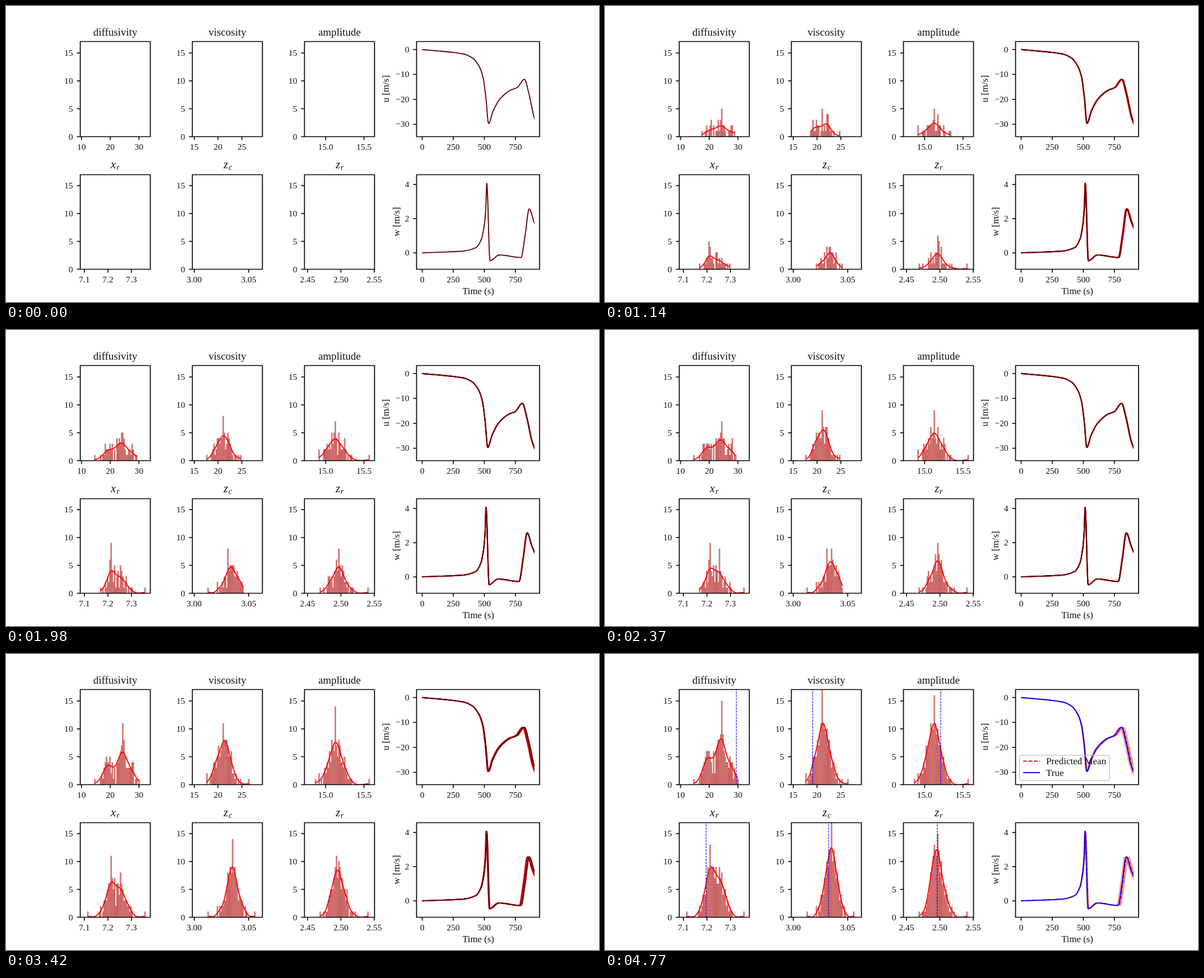
An HTML page with a canvas that plays this animation: 1058 by 529 pixels, repeating every 6450 ms.

```html
<!DOCTYPE html>
<html lang="en">
<head>
<meta charset="utf-8">
<title>Parameter sampling</title>
<style>
html, body { margin: 0; width: 100%; height: 100%; overflow: hidden; background: #fff; }
canvas { display: block; }
</style>
</head>
<body>
<canvas id="stage" width="1058" height="529"></canvas>
<script>
const ctx = document.getElementById('stage').getContext('2d');
const LOOP = 6450, STEP = 30, LAST = 159, REVEAL = 150;
const DRAWS = 158, BIN = 2.08, UNIT = 9.97, WIDTH = 125, TRAIL = 9, CURVE = 1.9;
const ROWS = [{ top: 63.5, base: 233.5 }, { top: 301.5, base: 470.5 }];
const RIGHT = 732.5, RIGHT_WIDTH = 219.5;

// modes: [share, centre, spread] of the distribution; span: its two outliers.
const panels = [
  { title: 'diffusivity', ticks: ['10', '20', '30'], at: 134.7, gap: 51.25, truth: 234.3,
    modes: [[0.32, 183, 7], [0.52, 206.5, 7], [0.16, 226, 5]], peak: 208, span: [158, 237] },
  { title: 'viscosity', ticks: ['15', '20', '25'], at: 335.8, gap: 42.5, truth: 370.5,
    modes: [[0.7, 388.5, 8.5], [0.18, 404, 8], [0.12, 372, 5.5]], peak: 387.7, span: [357.5, 434] },
  { title: 'amplitude', ticks: ['15.0', '15.5'], at: 570.3, gap: 68.4, truth: 599,
    modes: [[1, 587, 12]], peak: 587.7, span: [552, 647] },
  { title: 'x', sub: 'r', ticks: ['7.1', '7.2', '7.3'], at: 139.8, gap: 42, truth: 180.3,
    modes: [[0.58, 187.5, 9], [0.42, 207, 9]], peak: 187.5, span: [146, 247] },
  { title: 'z', sub: 'c', ticks: ['3.00', '3.05'], at: 335.8, gap: 97.2, truth: 399,
    modes: [[1, 403.5, 10.5]], peak: 404.2, span: [361, 444] },
  { title: 'z', sub: 'r', ticks: ['2.45', '2.50', '2.55'], at: 538, gap: 59.5, truth: 592.7,
    modes: [[0.75, 589.5, 9], [0.25, 602, 11]], peak: 594, span: [560.5, 646] }
];
const uKeys = [[742.5, 77.7], [815, 85.5], [832, 92.7], [844, 107.5], [851, 127], [856, 162], [861, 209.8],
  [869, 188], [881, 166.5], [900, 150.5], [912, 145.8], [925, 131], [933, 157], [942, 198], [950, 219]];
const wKeys = [[742.5, 441.2], [815, 438], [838, 432], [848, 417], [853.5, 390], [856, 362], [857.8, 317],
  [863.5, 455.3], [880, 445], [919, 449.4], [926, 411], [933.5, 362.5], [942, 386], [950, 405]];

const rand = n => { const v = Math.sin(n * 127.1 + 11.7) * 43758.5453; return v - Math.floor(v); };
const clamp = (v, lo, hi) => Math.min(hi, Math.max(lo, v));
const probit = q => 4.91 * (q ** 0.14 - (1 - q) ** 0.14);

// Loosely stratified draws, now and then the favourite value, in shuffled order.
function sample({ modes, peak, span }, seed) {
  const values = modes.flatMap(([share, centre, spread]) => {
    const n = Math.round(share * DRAWS);
    return Array.from({ length: n }, (_, j) => j % 28 === 14 ? peak
      : centre + spread * probit(clamp((j + 2 * rand(++seed) - 0.5) / n, 0.008, 0.992)));
  });
  const shuffled = values.map(x => ({ x, key: rand(++seed) })).sort((a, b) => a.key - b.key);
  return [
    ...shuffled.map(({ x }, i) => ({ x, born: i + 1 })),
    ...span.map(x => ({ x, born: 30 + 80 * rand(++seed) }))
  ];
}
panels.forEach((panel, i) => { panel.draws = sample(panel, 1000 * i); });

// Monotone cubic through the keys; late features move by up to `shift`.
function trace(keys, shift) {
  const pts = keys.map(([x, y]) => [x + shift * clamp((x - 825) / 90, 0, 1), y]);
  const slope = i => (pts[i + 1][1] - pts[i][1]) / (pts[i + 1][0] - pts[i][0]);
  const tangent = pts.map((_, i) => {
    if (i === 0) return slope(0);
    if (i === pts.length - 1) return slope(i - 1);
    const a = slope(i - 1), b = slope(i);
    return a * b <= 0 ? 0 : 2 * a * b / (a + b);
  });
  const out = [pts[0]];
  for (let i = 0; i < pts.length - 1; i++) {
    const [x0, y0] = pts[i], [x1, y1] = pts[i + 1], h = x1 - x0;
    for (let n = 1; n <= 10; n++) {
      const t = n / 10, r = 1 - t;
      out.push([x0 + h * t, y0 * r * r * (1 + 2 * t) + y1 * t * t * (3 - 2 * t)
        + h * t * r * (tangent[i] * r - tangent[i + 1] * t)]);
    }
  }
  return out;
}

// The spread of the sampled curves swells and shrinks.
function shiftAt(k) {
  if (k === 0) return 0;
  const wave = Math.cos(2 * Math.PI * (k - 23) / 91);
  return -2.9 + 0.7 * wave + (0.9 + 0.6 * wave) * clamp(probit(rand(k)), -2.2, 1.7);
}

// Dark red for the newest curve, through red to pale salmon.
function trailColor(age) {
  const f = age / (TRAIL - 1);
  return `hsl(${355 + 17 * f}, ${100 - 20 * f}%, ${20 + 75 * f}%)`;
}

function line(pts, color, width, dash = []) {
  ctx.beginPath();
  pts.forEach(([x, y]) => ctx.lineTo(x, y));
  ctx.strokeStyle = color;
  ctx.lineWidth = width;
  ctx.setLineDash(dash);
  ctx.stroke();
  ctx.setLineDash([]);
}

function label(text, x, y, size, align = 'center', style = '') {
  ctx.font = `${style} ${size}px "Liberation Serif", serif`;
  ctx.textAlign = align;
  ctx.fillStyle = '#111';
  ctx.fillText(text, x, y);
}

function upright(text, x, y) {
  ctx.save();
  ctx.translate(x, y);
  ctx.rotate(-Math.PI / 2);
  label(text, 0, 4.5, 17);
  ctx.restore();
}

function clipped(x, y, w, h, paint) {
  ctx.save();
  ctx.beginPath();
  ctx.rect(x, y, w, h);
  ctx.clip();
  paint();
  ctx.restore();
}

function axes(left, { top, base }, width, xTicks, yTicks) {
  ctx.strokeStyle = '#000';
  ctx.lineWidth = 1.7;
  ctx.strokeRect(left, top, width, base - top);
  for (const [text, x] of xTicks) {
    line([[x, base], [x, base + 6]], '#000', 1.6);
    label(text, x, base + 23.5, 15.5);
  }
  for (const [text, y] of yTicks) {
    line([[left - 6, y], [left, y]], '#000', 1.6);
    label(text, left - 13, y + 5, 15.5, 'right');
  }
}

function histogram(panel, left, base, k) {
  const xs = panel.draws.filter(d => d.born <= k).map(d => d.x), n = xs.length;
  const counts = new Map();
  for (const x of xs) {
    const bin = Math.floor((x - left) / BIN);
    counts.set(bin, (counts.get(bin) || 0) + 1);
  }
  ctx.fillStyle = '#e27272';
  ctx.strokeStyle = 'rgba(70, 10, 10, .4)';
  ctx.lineWidth = 0.5;
  for (const [bin, count] of counts) {
    const bar = [left + bin * BIN, base, BIN, -count * UNIT];
    ctx.fillRect(...bar);
    ctx.strokeRect(...bar);
  }
  if (n > 1) density(xs, base);
}

// Gaussian kernel density, scaled to the bar counts.
function density(xs, base) {
  const n = xs.length, mean = xs.reduce((a, b) => a + b) / n;
  const sd = Math.sqrt(xs.reduce((a, x) => a + (x - mean) ** 2, 0) / (n - 1));
  const width = Math.max(0.5, sd * n ** -0.2), min = Math.min(...xs), max = Math.max(...xs);
  const scale = BIN * UNIT / (width * Math.sqrt(2 * Math.PI));
  line(Array.from({ length: 81 }, (_, i) => {
    const x = min + (max - min) * i / 80;
    return [x, base - scale * xs.reduce((a, v) => a + Math.exp(-(((x - v) / width) ** 2) / 2), 0)];
  }), '#f00', CURVE);
}

function response(keys, { top, base }, k) {
  clipped(RIGHT, top, 942.8 - RIGHT, base - top, () => {
    if (k < REVEAL) {
      for (let age = Math.min(k, TRAIL - 1); age >= 0; age--)
        line(trace(keys, shiftAt(k - age)), trailColor(age), CURVE);
      return;
    }
    const low = trace(keys, -6.3), high = trace(keys, 0.8);
    ctx.beginPath();
    [...low, ...[...high].reverse()].forEach(([x, y]) => ctx.lineTo(x, y));
    ctx.fillStyle = 'rgba(255, 0, 0, .35)';
    ctx.fill();
    [low, high].forEach(edge => line(edge, 'rgba(255, 0, 0, .3)', 1.6));
    line(trace(keys, -2.4), '#f00', CURVE, [6.7, 2.9]);
    line(trace(keys, -3.5), '#00f', CURVE);
  });
}

function legend() {
  ctx.strokeStyle = '#ccc';
  ctx.lineWidth = 1.6;
  ctx.beginPath();
  ctx.roundRect(739.5, 181, 160.5, 45, 3);
  ctx.stroke();
  line([[746, 191.5], [776, 191.5]], '#f00', CURVE, [6.7, 2.9]);
  line([[746, 212], [776, 212]], '#00f', CURVE);
  label('Predicted Mean', 787, 197, 17, 'left');
  label('True', 787, 217.5, 17, 'left');
}

function drawPanel(panel, i, k) {
  const row = ROWS[Math.floor(i / 3)], { top, base } = row;
  const left = 132.5 + 200 * (i % 3), mid = left + WIDTH / 2;
  clipped(left, top, WIDTH, base - top, () => {
    histogram(panel, left, base, k);
    if (k >= REVEAL) line([[panel.truth, base], [panel.truth, top]], '#00f', 1.1, [3.9, 1.7]);
  });
  axes(left, row, WIDTH, panel.ticks.map((text, n) => [text, panel.at + n * panel.gap]),
    [0, 5, 10, 15].map(v => [v, base - v * UNIT]));
  if (panel.sub) {
    label(panel.title, mid + 1, top - 11.5, 20, 'right', 'italic');
    label(panel.sub, mid + 2, top - 8.5, 14, 'left', 'italic');
  } else label(panel.title, mid, top - 10.5, 18.9);
}

function draw(k) {
  ctx.fillStyle = '#fff';
  ctx.fillRect(0, 0, 1058, 529);
  ctx.lineJoin = 'round';
  panels.forEach((panel, i) => drawPanel(panel, i, k));

  const times = [0, 250, 500, 750].map(t => [t, 742.5 + t * 0.2219]);
  response(uKeys, ROWS[0], k);
  response(wKeys, ROWS[1], k);
  axes(RIGHT, ROWS[0], RIGHT_WIDTH, times, [0, 10, 20, 30].map(v => [v ? '−' + v : '0', 77.7 + v * 4.457]));
  axes(RIGHT, ROWS[1], RIGHT_WIDTH, times, [0, 2, 4].map(v => [v, 441.3 - v * 30.6]));
  upright('u [m/s]', 678, 148);
  upright('w [m/s]', 697.5, 385.5);
  label('Time (s)', 842.5, 515, 16.8);
  if (k >= REVEAL) legend();
}

let shown = -1;
function tick(now) {
  const k = Math.min(LAST, Math.floor((now % LOOP) / STEP));
  if (k !== shown) draw(shown = k);
  requestAnimationFrame(tick);
}
draw(0);
requestAnimationFrame(tick);
</script>
</body>
</html>
```
